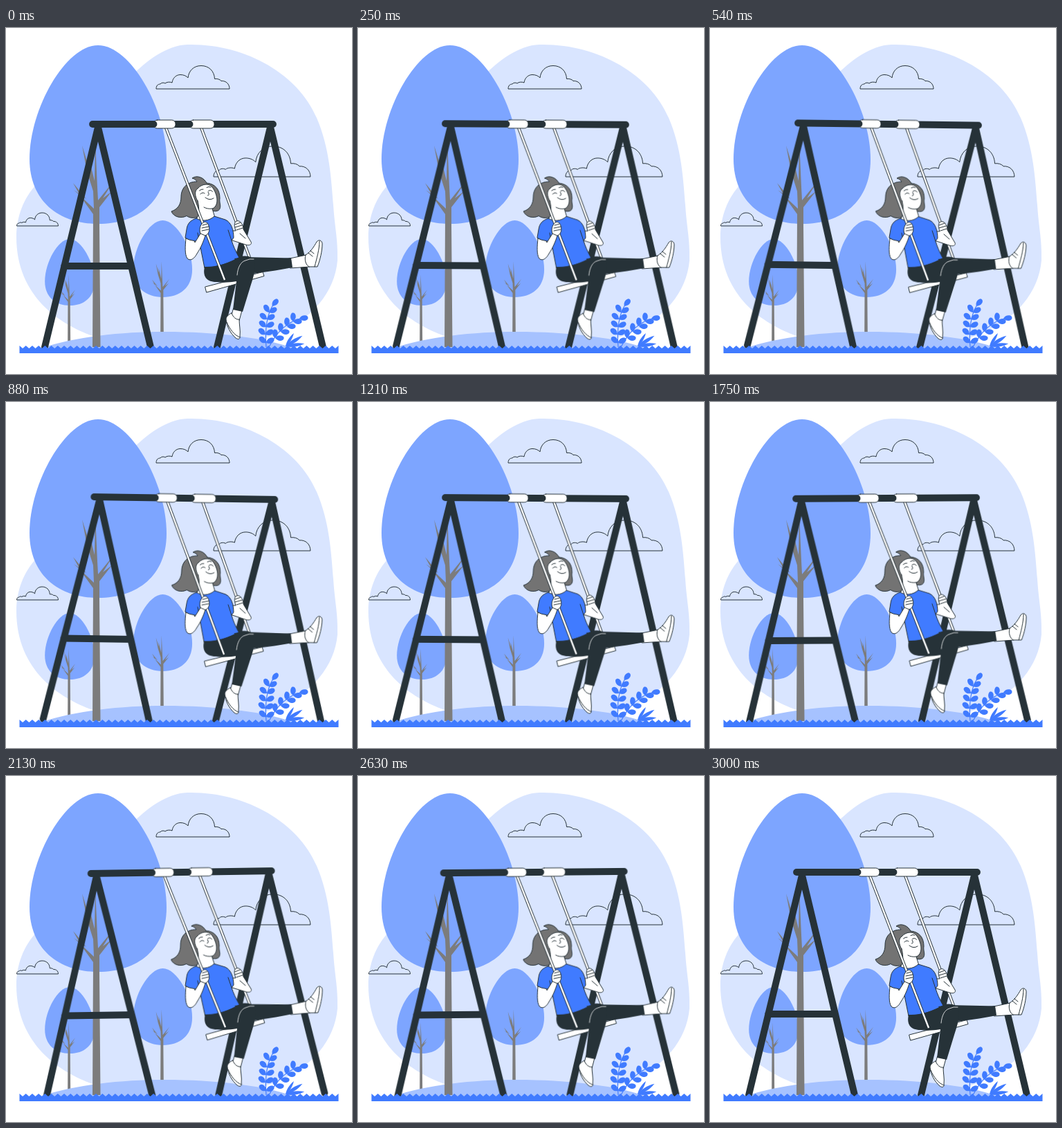
Write an HTML page that moves like this. It is 500x500 px and loops after 3.04 s.

```html
<!DOCTYPE html>
<html lang="en">
<head>
<meta charset="utf-8">
<title>Girl on a swing</title>
<style>
  html, body { margin: 0; width: 100%; height: 100%; overflow: hidden; background: #fff; }
  svg { display: block; width: 100vw; height: 100vh; }
  .blue { fill: #407bff; }
  .crown { fill: #7da5ff; }
  .trunk { fill: #7c7c7c; }
  .hill { fill: #a6c2ff; }
  .cloud { fill: none; stroke: #263238; stroke-width: 1; vector-effect: non-scaling-stroke; }
  .bar { fill: none; stroke: #263238; stroke-width: 9.8; stroke-linecap: round; stroke-linejoin: round; }
  .ink { stroke: #263238; stroke-width: 1; stroke-linejoin: round; stroke-linecap: round; }
  .white { fill: #fff; }
  .hair { fill: #737373; }
  .dark { fill: #263238; }
  .line { fill: none; }
  .rope-edge { stroke: #263238; stroke-width: 4.2; }
  .rope { stroke: #fff; stroke-width: 2.3; }
  .stem { fill: none; stroke: #407bff; stroke-width: 1.2; }

  /* 3 s of sway, then a 40 ms rest at the loop point */
  #swing { transform-origin: 257px 298px; animation: sway 3040ms linear infinite; }
  @keyframes sway {
    0% { transform: rotate(0deg); }
    24.671% { transform: rotate(1deg); }
    74.013% { transform: rotate(-1deg); }
    98.684%, 100% { transform: rotate(0deg); }
  }
</style>
</head>
<body>
<svg viewBox="0 0 500 500">
  <defs>
    <path id="cloud" class="cloud" d="M0 0C0 -4 2 -7 6 -7C7 -9 11 -9.500 13 -8C15 -10 20 -10.500 23 -9C24 -16 29 -20.500 35 -20.500C40 -20.500 44 -18.500 46 -16C47 -26 54 -33.500 65 -33.500C76 -33.500 84 -26 84.500 -14.500C88 -15 92 -14 94 -11.500C101 -12 106 -7 106 0Z"/>
    <g id="tree">
      <path class="crown" d="M0 0C47 0 99 92 99 165C99 226 57 258 0 258C-57 258 -99 225 -99 164C-99 92 -47 0 0 0Z"/>
      <path class="trunk" d="M-4 138L-1 205L0 224L22 197L7 221L20 211L2 234V262L3.500 436H-8L-7 244L-25 219L-36 199L-17 222L-35 209L-6 236L-7 211L-16 182L-23 145L-13 177L-14 160L-5 196Z"/>
    </g>
    <path id="leaf" d="M0 0C3 -5 9 -5 12 -2.500C13.500 0 12 3 8 3.500C5 4 2 2 0 0Z"/>
    <path id="blade" d="M0 0C7 -3 16 -3 25 0C17 3 7 3 0 0Z"/>
  </defs>

  <path fill="#d9e5ff" d="M262 24C345 22 422 66 449 130C468 174 470 220 473 256C475 288 480 306 479 336C475 382 442 420 395 440C330 470 205 470 125 445C78 428 15 388 15 302C15 272 26 245 44 226C80 170 130 125 182 69C202 48 232 25 262 24Z"/>

  <use href="#cloud" transform="translate(217 88)"/>
  <use href="#cloud" transform="translate(300 215) scale(1.320)"/>
  <use href="#cloud" transform="translate(15.500 286) scale(.566)"/>

  <use href="#tree" transform="translate(226.500 278) scale(.43)"/>
  <use href="#tree" transform="translate(92 305) scale(.362 .372)"/>
  <path class="hill" d="M50 463C100 446 165 439 230 439C300 439 378 447 425 466H50Z"/>
  <use href="#tree" transform="translate(133 25)"/>

  <g id="swing">
    <!-- frame -->
    <path class="bar" d="M56 461L133 143L209 461M84 344H181M305 461L382 143L458 461M290 139H386"/>

    <g id="ropeFar">
      <path class="rope-edge" d="M282 144L359.500 352"/>
      <path class="rope" d="M282 144L359.500 352"/>
    </g>
    <rect class="white ink" x="265" y="133" width="36" height="12" rx="5.500"/>
    <path class="bar" d="M235 139H265.500"/>

    <!-- seat -->
    <path class="white ink" d="M288 374L371 352.500L373 358.500L290 382Z"/>

    <!-- far arm -->
    <path class="white ink" d="M322 293L332 293C330 287 329 281 333 279C338 277 343 284 343 291L354 309C356 313 351 315 346 313L324 306Z"/>
    <path class="ink line" d="M331 284L339 281M331 288L341 285M333 292L342 289M338 297L346 304"/>

    <!-- hair, neck and face -->
    <path class="hair ink" d="M290 224C286 216 276 212 269 217C273 218 275 220 276 222C260 222 253 233 253 244C253 255 248 262 239 265C242 273 253 276 261 271.500C267 276 277 275 281 270L296 263C301 266 308 265 309 261C311 257 308 252 309 246C309 233 302 225 290 224Z"/>
    <path class="white ink" d="M277 250C273 244 272 235 277 232C283 225 293 224 298 230C302 235 305 243 305 249C305 257 300 261 298 261L302 274C295 281 280 281 275 276C279 271 280 262 277 250Z"/>
    <path class="ink line" d="M281 240Q284 236.500 287 239M292.500 235.500Q296 233 298.500 236.500M279.500 235Q282 232.500 285 233M290 230.500Q293 228.500 296 230M292 237Q295 242 291.500 242M288 245Q294 250 300 246M286 259Q291 262 298 261"/>

    <!-- shirt -->
    <path class="blue ink" d="M275 275C266 278 262 283 261 291L259 303C264 307 272 309 279 307L287 347C304 346 322 340 337 332C332 323 328 314 326 307L329 303C329 293 326 281 317 277L301 272C294 279 282 280 275 275Z"/>
    <path class="ink line" d="M279 307L277 296M326 307L321 292"/>

    <!-- far leg -->
    <path class="white ink" d="M410 333L434 328L439 345L411 347Z"/>
    <path class="white ink" d="M433 328C440 324 445 316 449 309C452 305 457 307 457 312C457 322 454 335 450 345L438 345C433 342 431 335 433 328Z"/>
    <path class="ink line" d="M453 308C453 320 449 333 446 345M440 322L445 326M437 325L443 330"/>
    <path class="dark" d="M330 333C352 329 385 333 412 332L414 346C393 350 368 354 345 356Z"/>

    <!-- near leg -->
    <path class="white ink" d="M329 405L341 408L337 423L325 420Z"/>
    <path class="white ink" d="M326 412C321 414 318 418 318 421C319 431 324 441 332 448C336 451 339 449 338 445C339 437 337 429 337 421C333 422 328 418 326 412Z"/>
    <path class="ink line" d="M319 425C323 435 330 444 338 447"/>
    <path class="dark" d="M287 345C303 346 321 340 337 331C349 327 361 332 360 342C360 352 357 362 353 374L342 410L328 407L333 366C322 368 313 368 304 367C289 367 284 358 287 345Z"/>
    <path fill="none" stroke="#fff" stroke-width=".8" stroke-linecap="round" d="M334 357C335 346 339 338 346 336Q352 333 358 334"/>

    <!-- near rope -->
    <path class="rope-edge" d="M231 144L316 364"/>
    <path class="rope" d="M231 144L316 364"/>
    <rect class="white ink" x="213" y="133" width="32" height="12" rx="5.500"/>
    <path class="bar" d="M125 139H213.500"/>

    <!-- near arm -->
    <path class="white ink" d="M260 304C259 315 258 327 262 333C267 338 273 332 276 326C282 317 285 309 288 300C293 298 295 292 293 286C292 281 288 279 285 281C280 285 279 292 281 297L273 310L272 307.500Q265 307 260 304Z"/>
    <path class="ink line" d="M284 285L291 283M283 289L293 287M283 293L293 291M281 297L288 300"/>
  </g>

  <g class="blue" id="bush">
    <path class="stem" d="M376 461C374 436 376 416 386 400M380 461C391 440 405 425 428 419"/>
  </g>
  <path class="blue" id="grass"/>
</svg>
<script>
  const bush = document.getElementById('bush');
  const grow = (shape, x, y, angle, size = 1) => {
    const el = document.createElementNS('http://www.w3.org/2000/svg', 'use');
    el.setAttribute('href', '#' + shape);
    el.setAttribute('transform', `translate(${x} ${y}) rotate(${angle}) scale(${size})`);
    bush.append(el);
  };

  // leaves in pairs along the upright stem, then along the leaning one
  grow('leaf', 385, 402, -50);
  [[380, 411], [377, 421], [376, 432], [375, 443], [376, 455]].forEach(([x, y], i) => {
    grow('leaf', x, y, i ? -137 : -118);
    grow('leaf', x, y, -24);
  });
  grow('leaf', 424, 420, -4);
  [[415, 424], [406, 431], [397, 439], [389, 448]].forEach(([x, y]) => {
    grow('leaf', x, y, -88);
    grow('leaf', x, y, 4);
  });
  [[-58, .9], [-32, 1.150], [-8, 1.100]].forEach(([a, s]) => grow('blade', 404, 460, a, s));

  document.getElementById('grass')
    .setAttribute('d', 'M19.500 459' + 'l4.610 4l4.610 -4'.repeat(50) + 'V470H19.500Z');
</script>
</body>
</html>
```
